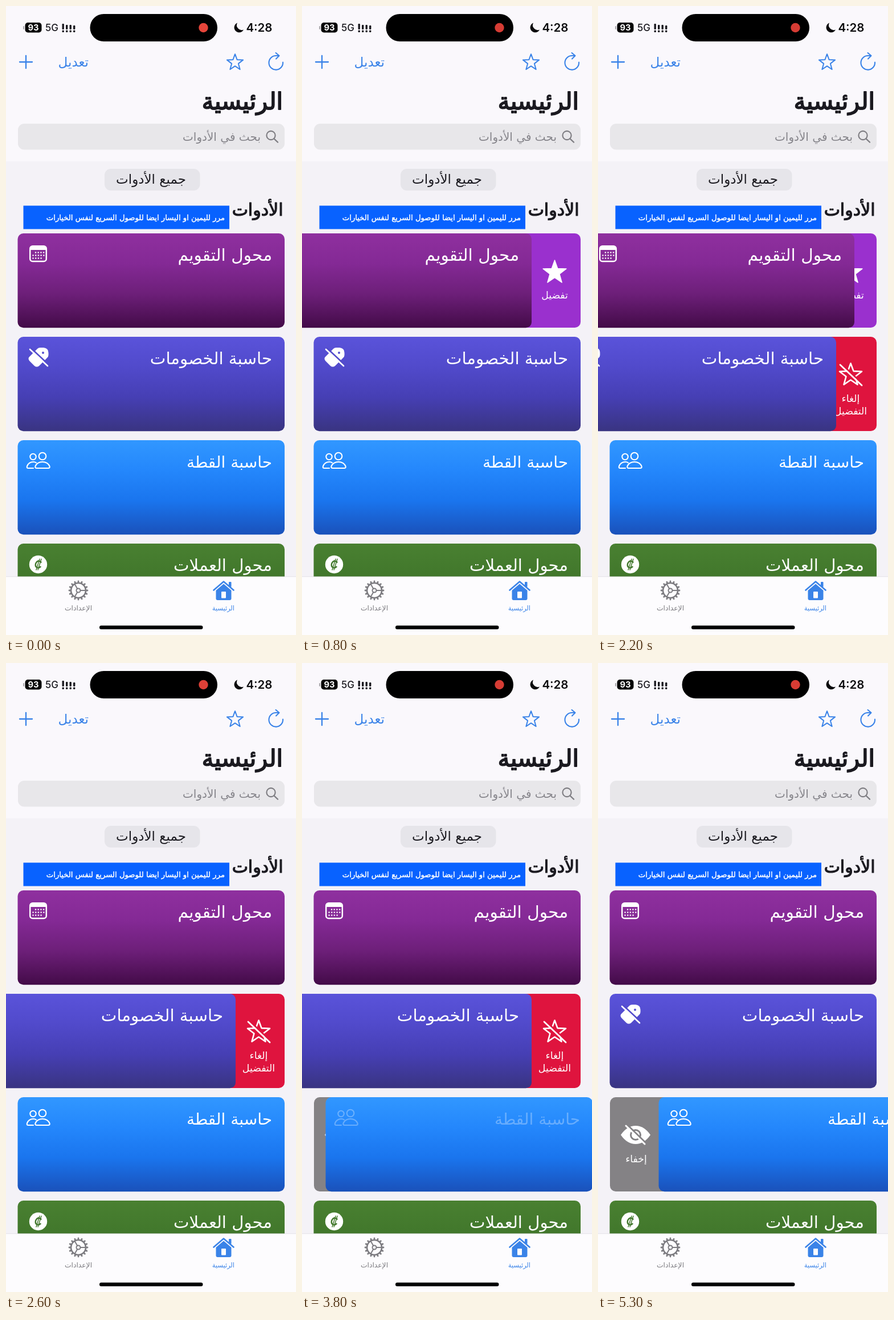
These frames come from a looping animation (509x1101 px, 5.4 s). An HTML page:

```html
<!DOCTYPE html>
<html lang="ar">
<head>
<meta charset="utf-8">
<title>الأدوات</title>
<style>
  html, body { margin: 0; width: 100%; height: 100%; overflow: hidden; background: #faf8fc; }
  svg { display: block; width: 100%; height: 100%; }
  text { font-family: 'DejaVu Sans', sans-serif; }
  .latin { font-family: Inter, sans-serif; }
  .line { fill: none; stroke-linecap: round; stroke-linejoin: round; }
</style>
</head>
<body>
<svg id="stage" viewBox="0 0 509 1101"></svg>
<script>
const LOOP = 5400, STEP = 100;
const BLUE = '#3a83e8', WHITE = '#fff', GREY = '#7d7c81', INK = '#1b1a20';
const stage = document.getElementById('stage');

const label = (str, x, y, size, fill, anchor = 'end', extra = '') =>
  `<text x="${x}" y="${y}" font-size="${size}" fill="${fill}" text-anchor="${anchor}" ${extra}>${str}</text>`;
// Thickened regular letters: narrower than the bold face.
const heavy = (str, x, y, size, fill, weight) =>
  label(str, x, y, size, fill, 'end', `stroke="${fill}" stroke-width="${weight}" stroke-linejoin="round"`);
const box = (x, y, w, h, r, fill, extra = '') =>
  `<rect x="${x}" y="${y}" width="${w}" height="${h}" rx="${r}" fill="${fill}" ${extra}/>`;
const dot = (x, y, r, fill, extra = '') =>
  `<circle cx="${x}" cy="${y}" r="${r}" fill="${fill}" ${extra}/>`;
const line = (d, color, width) =>
  `<path class="line" d="${d}" stroke="${color}" stroke-width="${width}"/>`;
const ring = (x, y, r, color, width) =>
  dot(x, y, r, 'none', `stroke="${color}" stroke-width="${width}"`);

function star(x, y, outer, inner) {
  const points = Array.from({ length: 10 }, (_, i) => {
    const r = i % 2 ? inner : outer, a = (i / 5 - 0.5) * Math.PI;
    return (x + r * Math.cos(a)).toFixed(1) + ' ' + (y + r * Math.sin(a)).toFixed(1);
  });
  return `M${points.join('L')}Z`;
}

function slash(x1, y1, x2, y2, color, gap, width) {
  return line(`M${x1 + 2} ${y1 - 2}L${x2 + 2} ${y2 - 2}`, gap, width) +
    line(`M${x1} ${y1}L${x2} ${y2}`, color, width);
}

function calendarIcon() {
  const row = (y, from, count) => Array.from({ length: count },
    (_, i) => dot(from + i * 4.7, y, 1.25, WHITE)).join('');
  return box(42.2, 420.2, 28.6, 26.8, 4.5, 'none', `stroke="${WHITE}" stroke-width="2.5"`) +
    `<path d="M42 427V424Q42 420 46 420H67Q71 420 71 424V427Z" fill="${WHITE}"/>` +
    row(431.5, 52, 4) + row(436.5, 47.5, 5) + row(441.5, 47.5, 4);
}

function tagIcon() {
  return `<path d="M60 598H66Q74.5 599 74.5 607V611Q74.500 614 72 616L58 630Q54 633 50 630L41 621Q38 617 41 614L55 600Q57 598 60 598Z" fill="${WHITE}"/>` +
    dot(65, 607, 2, '#554fd0') + slash(42, 601, 73, 630, WHITE, '#524bcb', 2.6);
}

function peopleIcon() {
  return ring(47.5, 789, 5.2, WHITE, 2.1) + ring(64, 788, 6.3, WHITE, 2.1) +
    line('M48 809H39Q36 809 37 805.5Q40 798 48 798Q51 798 53 799.5', WHITE, 2.1) +
    line('M54 809Q50.5 809 51.5 805.5Q55 798 64 798Q73 798 76.5 805.5Q77.5 809 74 809Z', WHITE, 2.1);
}

function coinIcon() {
  return dot(56.5, 977.5, 15.7, WHITE) +
    line('M61.5 973.5Q58 969.5 54 973Q50.5 977 52.5 981.5Q56 985.5 60.5 981.5', '#44792f', 2.5) +
    line('M59 968L53 987M62 968L56 987', '#44792f', 1.5);
}

function eyeIcon() {
  return `<path d="M40 826Q51 810 66 810Q81 810 92 826Q81 842 66 842Q51 842 40 826Z" fill="${WHITE}"/>` +
    ring(66, 826, 8.5, '#848285', 3) + slash(49, 810, 82, 842, WHITE, '#848285', 3);
}

// Swipeable cards: resting place, gradient, and the action hidden beneath each one.
const cards = [
  {
    y: 398, title: 'محول التقويم', size: 29.6, icon: calendarIcon(),
    shades: ['#8f309f', '#842995', '#6d1f79', '#430b48'], action: '#9a30ce',
    under: `<path d="${star(443.5, 466.5, 21.5, 8.8)}" fill="${WHITE}" stroke="${WHITE}" stroke-width="1.5" stroke-linejoin="round"/>` +
      label('تفضيل', 443.5, 512, 17.2, WHITE, 'middle'),
    path: [[200, 0], [300, -21], [400, -52], [500, -75], [600, -86], [2100, -86],
      [2200, -39], [2300, -14], [2400, -4], [2500, 0]],
    press: 200
  },
  {
    y: 579, title: 'حاسبة الخصومات', size: 29.3, icon: tagIcon(),
    shades: ['#5a53da', '#514acb', '#463fb4', '#393481'], action: '#df143e',
    under: line(star(443.5, 646, 20.5, 8.5), WHITE, 2.6) +
      slash(425, 628, 463, 664, WHITE, '#df143e', 2.8) +
      label('إلغاء', 443.5, 693, 17.3, WHITE, 'middle') +
      label('التفضيل', 443.5, 715, 17.3, WHITE, 'middle'),
    path: [[1900, 0], [2000, -21], [2100, -48], [2200, -71], [2300, -82], [2400, -86],
      [3800, -86], [3900, -60], [4000, -28], [4100, -10], [4200, -3], [4300, 0]],
    press: 1900
  },
  {
    y: 760, title: 'حاسبة القطة', size: 28, icon: peopleIcon(),
    shades: ['#3197ff', '#2487fc', '#1a75ee', '#1a51ba'], action: '#848285',
    under: eyeIcon() + label('إخفاء', 67, 874, 17.3, WHITE, 'middle'),
    path: [[3700, 0], [3800, 21], [3900, 52], [4000, 75], [4100, 86]],
    press: 3700
  },
  {
    y: 941, title: 'محول العملات', size: 29.2, icon: coinIcon(),
    shades: ['#498031', '#42782c', '#366524', '#214118'], action: 'none', under: '',
    path: [[0, 0]], press: -1000
  }
];

const gradient = (card, i) => `<linearGradient id="shade${i}" x2="0" y2="1">` +
  card.shades.map((c, k) => `<stop offset="${[0, 0.32, 0.64, 1][k]}" stop-color="${c}"/>`).join('') +
  '</linearGradient>';

const cardMarkup = (card, i) => `
  <g id="under${i}">${box(21, card.y, 468, 165, 10, card.action)}${card.under}</g>
  <g id="card${i}">${box(20.5, card.y, 468.5, 165.3, 10, `url(#shade${i})`)}
    <g id="face${i}">${card.icon}${label(card.title, 467, card.y + 47.5, card.size, WHITE)}</g>
  </g>`;

function statusBar() {
  const bars = [31, 33, 33, 34].map((top, i) =>
    box(98.5 + i * 6.5, top, 3.4, 41 - top, 1.2, INK) + box(98.5 + i * 6.5, 42.5, 3.4, 3.5, 1.2, INK)).join('');
  return box(33.5, 29, 29, 17.5, 5, '#050505') + box(30, 35, 2, 6, 1, '#aaa9ad') +
    label('93', 48, 43, 14.8, WHITE, 'middle', 'class="latin" font-weight="700"') +
    label('5G', 69, 44, 17, INK, 'start', 'class="latin" font-weight="500"') + bars +
    box(147.5, 14, 223.5, 48, 24, '#000') + dot(346.5, 38, 8.2, '#e5453a', 'id="record"') +
    '<path d="M406 29.5A8.7 8.7 0 1 0 417 41.5A8.7 8.7 0 0 1 406 29.5Z" fill="#0b0b0d"/>' +
    label('4:28', 467.5, 45, 20.5, '#0b0b0d', 'end', 'class="latin" font-weight="600"');
}

function header() {
  return line('M24 98H46M35 87V109', BLUE, 2.3) +
    label('تعديل', 145, 106, 23, BLUE) +
    line(star(402, 99, 14.8, 6.2), BLUE, 2) +
    line('M486 98.5A12.3 12.3 0 1 1 473.7 87H479M473.5 82L479.5 87L474 92.5', BLUE, 2.1) +
    heavy('الرئيسية', 486, 181, 41.3, INK, 1.8) +
    box(21, 206, 468, 45.5, 11, '#e8e7ea') +
    ring(465, 226.5, 7.6, GREY, 2.1) + line('M470.7 232.5L477 238.5', GREY, 2.4) +
    label('بحث في الأدوات', 447, 236, 20, '#85848a') +
    box(173, 285, 167.5, 38, 11, '#e6e5ea') +
    label('جميع الأدوات', 316, 311, 23, INK) +
    heavy('الأدوات', 486.5, 367, 30, INK, 1.2) +
    box(30.5, 349.5, 361.5, 41, 0, '#0862ff') +
    heavy('مرر لليمين او اليسار ايضا للوصول السريع لنفس الخيارات', 384, 375, 13.2, WHITE, 0.45);
}

function gearIcon() {
  const spoke = (a, from, to) => `M${127 + from * Math.cos(a)} ${1023 + from * Math.sin(a)}` +
    `L${127 + to * Math.cos(a)} ${1023 + to * Math.sin(a)}`;
  const teeth = Array.from({ length: 16 }, (_, i) => spoke(i * Math.PI / 8, 14, 16)).join('');
  const arms = [0, 1, 2].map(i => spoke(i * Math.PI * 2 / 3, 3.5, 12)).join('');
  return ring(127, 1023, 13, GREY, 2.6) + line(teeth, GREY, 2.8) +
    line(arms, GREY, 2) + ring(127, 1023, 3.5, GREY, 2);
}

function tabBar() {
  return box(0, 999, 509, 102, 0, '#fdfcfe') + box(0, 998.5, 509, 0.8, 0, '#dddce1') +
    gearIcon() + label('الإعدادات', 127, 1058, 12.3, GREY, 'middle') +
    line('M364.5 1022.5L382 1007.5L399.5 1022.5', BLUE, 2.6) +
    box(391, 1008, 4.5, 9, 1, BLUE) +
    `<path d="M368.5 1023L382 1011.5L395.5 1023V1037Q395.5 1040 392.5 1040H371.5Q368.5 1040 368.5 1037Z" fill="${BLUE}"/>` +
    box(378, 1025, 8, 11.5, 1, '#fdfcfe') +
    label('الرئيسية', 381.5, 1058, 11.3, BLUE, 'middle') +
    box(164, 1084.5, 181.5, 6.5, 3.2, '#000');
}

stage.innerHTML = `<defs>${cards.map(gradient).join('')}</defs>` +
  box(0, 0, 509, 1101, 0, '#faf8fc') + box(0, 272, 509, 829, 0, '#f4f2f7') +
  statusBar() + header() + cards.map(cardMarkup).join('') + tabBar();

const byId = id => document.getElementById(id);
const parts = cards.map((_, i) => ({ under: byId('under' + i), card: byId('card' + i), face: byId('face' + i) }));
const record = byId('record');

function follow(points, t) {
  const next = points.findIndex(p => p[0] > t);
  if (next === 0) return points[0][1];
  if (next < 0) return points[points.length - 1][1];
  const [t0, v0] = points[next - 1], [t1, v1] = points[next];
  return v0 + (v1 - v0) * (t - t0) / (t1 - t0);
}

function draw(t) {
  cards.forEach((card, i) => {
    const shift = follow(card.path, t), p = card.press;
    parts[i].card.setAttribute('transform', `translate(${shift})`);
    parts[i].under.setAttribute('visibility', shift ? 'visible' : 'hidden');
    parts[i].face.setAttribute('opacity', follow([[p - 100, 1], [p, 0.3], [p + 100, 0.3], [p + 300, 1]], t));
  });
  const glow = (1 + Math.cos(t / 1500 * Math.PI * 2)) / 2;
  record.setAttribute('fill', `rgb(${214 + 16 * glow},${60 + 9 * glow},${52 + 6 * glow})`);
}

const start = performance.now();
function tick() {
  const t = (performance.now() - start) % LOOP;
  draw(Math.floor(t / STEP) * STEP);
  requestAnimationFrame(tick);
}
tick();
</script>
</body>
</html>
```
